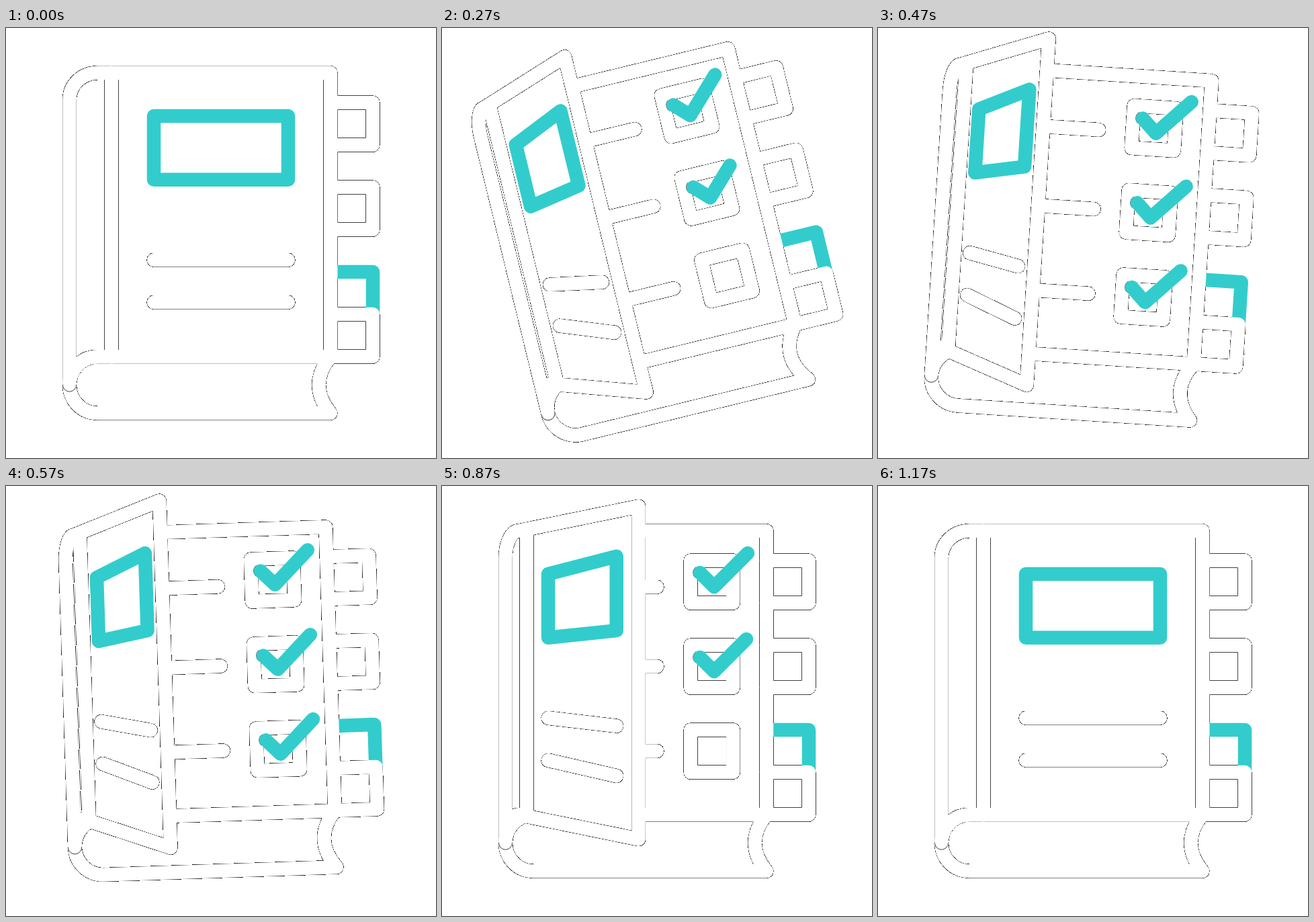
An HTML page with a canvas that plays this animation: 640 px wide and 640 px high, repeating every 1670 ms.

```html
<!DOCTYPE html>
<html lang="en">
<head>
<meta charset="utf-8">
<title>Checklist book</title>
<style>
  html, body { margin: 0; width: 100%; height: 100%; overflow: hidden; background: #fff; }
  canvas { display: block; width: 100vw; height: 100vh; }
</style>
</head>
<body>
<canvas id="stage" width="640" height="640"></canvas>
<script>
const SIZE = 640, LOOP = 1670, LAST_STEP = 35, STEPS_PER_MS = 0.03;
const WHITE = '#fff', TEAL = '#33cccc', LINE = 20.5;
const PIVOT = { x: 304, y: 288 };
const TOP = 66.75, BOTTOM = 489.25, SPINE = 94.5, EDGE = 483;
const ROWS = [0, 126, 252];
const CHECK_LENGTH = Math.hypot(21, 21) + Math.hypot(50, 50);

// Key times are in animation steps of 1/30 s.
const TILT = [[0, 0], [7.2, -15], [12.3, 5], [19.5, -4.5], [22.7, 0]];
const OPENING = [[0, 0], [8.9, 1], [22, 1], [35, 0]];
const CHECKS = [
  [[0, 0], [4.4, 1], [30.5, 1], [35, 0]],
  [[4.2, 0], [9.2, 1], [25.5, 1], [30.5, 0]],
  [[9, 0], [14, 1], [20, 1], [25, 0]]
];

const ctx = document.getElementById('stage').getContext('2d', { willReadFrequently: true });

const mix = (a, b, u) => a + (b - a) * u;
const smooth = u => u * u * (3 - 2 * u);

function track(keys, time) {
  if (time <= keys[0][0]) return keys[0][1];
  for (let i = 1; i < keys.length; i++) {
    const [t0, v0] = keys[i - 1], [t1, v1] = keys[i];
    if (time <= t1) return mix(v0, v1, smooth((time - t0) / (t1 - t0)));
  }
  return keys[keys.length - 1][1];
}

function stroke(color, path, width = LINE) {
  ctx.strokeStyle = color;
  ctx.lineWidth = width;
  ctx.beginPath();
  path();
  ctx.stroke();
}

function lines(points, closed) {
  points.forEach(([x, y], i) => i ? ctx.lineTo(x, y) : ctx.moveTo(x, y));
  if (closed) ctx.closePath();
}

const polyline = (color, points, closed) => stroke(color, () => lines(points, closed));

function drawTab(color, y) {
  polyline(color, [[EDGE, y], [546, y], [546, y + 63], [EDGE, y + 63]]);
}

function drawBook() {
  ctx.lineCap = 'butt';
  polyline(TEAL, [[EDGE, 363], [546, 363], [546, 426]]);
  ctx.lineCap = 'round';
  drawTab(WHITE, 111);
  drawTab(WHITE, 237);
  drawTab(WHITE, 426);
  polyline(WHITE, [[136, TOP], [EDGE, TOP], [EDGE, BOTTOM]]);
  stroke(WHITE, () => {
    ctx.moveTo(EDGE, BOTTOM);
    ctx.lineTo(136.5, BOTTOM);
    ctx.arc(136.5, BOTTOM + 42, 42, -Math.PI / 2, Math.PI / 2, true);
    ctx.lineTo(EDGE, BOTTOM + 84);
    ctx.quadraticCurveTo(448.4, 531, EDGE, BOTTOM);
  });
}

function drawPage(step) {
  ROWS.forEach((dy, i) => {
    const pillY = i ? 142.5 + dy : 150.3;
    polyline(WHITE, [[200, pillY], [320, pillY]]);
    polyline(WHITE, [[370, 111 + dy], [433.3, 111 + dy], [433.3, 174 + dy], [370, 174 + dy]], true);

    const drawn = track(CHECKS[i], step) * CHECK_LENGTH;
    if (drawn <= 0) return;
    stroke('#222', () => ctx.arc(384, 129 + dy, 10.4, Math.PI * 0.75, Math.PI * 1.3), 0.8);
    ctx.setLineDash([drawn, 300]);
    polyline(TEAL, [[384, 129 + dy], [405, 150 + dy], [455, 100 + dy]]);
    ctx.setLineDash([]);
  });
}

function drawCover(open) {
  const shift = 47 * open;
  const right = mix(EDGE, 237, open);
  const bend = mix(136, 108, open);
  const hinge = mix(157, 117, open);
  const hingeShift = shift * (hinge - bend) / (right - bend);
  const rx = bend - SPINE;

  const outline = () => {
    ctx.moveTo(SPINE, 531);
    ctx.lineTo(SPINE, TOP + 40);
    ctx.ellipse(bend, TOP + 40, rx, 40, 0, Math.PI, Math.PI * 1.5);
    ctx.lineTo(right, TOP - shift);
    ctx.lineTo(right, BOTTOM + shift);
    ctx.lineTo(bend, BOTTOM);
    ctx.ellipse(bend, BOTTOM + 42, rx, 42, 0, Math.PI * 1.5, Math.PI, true);
  };

  // The cover hides the page although its inside stays empty.
  ctx.globalCompositeOperation = 'destination-out';
  ctx.beginPath();
  outline();
  ctx.fill();
  ctx.globalCompositeOperation = 'source-over';

  stroke(WHITE, outline);
  polyline(WHITE, [[hinge, TOP - hingeShift], [hinge, BOTTOM + hingeShift]]);
  stroke('#111', () => ctx.arc(SPINE, 531, 10.2, 0, Math.PI), 0.8);

  const left = mix(220, 140, open), far = mix(420, 213, open);
  polyline(TEAL, [
    [left, 131], [far, mix(131, 97, open)],
    [far, mix(225.7, 212, open)], [left, 225.7]
  ], true);
  polyline(WHITE, [[left, 345.25], [far, 345.25 + 15.4 * open]]);
  polyline(WHITE, [[left, 408.25], [far, 408.25 + 30 * open]]);
}

// Soft edges of white strokes turn dark; other soft edges blend into white.
function finishEdges() {
  const image = ctx.getImageData(0, 0, SIZE, SIZE);
  const px = image.data;
  for (let i = 0; i < px.length; i += 4) {
    const alpha = px[i + 3];
    const isWhite = px[i] > 128;
    for (let c = i; c < i + 3; c++) {
      px[c] = alpha > 5 && isWhite ? px[c] * alpha / 255 : mix(255, px[c], alpha / 255);
    }
    px[i + 3] = 255;
  }
  ctx.putImageData(image, 0, 0);
}

function draw(step) {
  ctx.setTransform(1, 0, 0, 1, 0, 0);
  ctx.clearRect(0, 0, SIZE, SIZE);
  ctx.translate(PIVOT.x, PIVOT.y);
  ctx.rotate(track(TILT, step) * Math.PI / 180);
  ctx.translate(-PIVOT.x, -PIVOT.y);
  ctx.lineCap = ctx.lineJoin = 'round';
  drawBook();
  drawPage(step);
  drawCover(track(OPENING, step));
  finishEdges();
}

let shown = -1;
const start = performance.now();

function tick() {
  const time = (performance.now() - start) % LOOP;
  const step = Math.min(LAST_STEP, Math.floor(time * STEPS_PER_MS + 0.12));
  if (step !== shown) draw(shown = step);
  requestAnimationFrame(tick);
}
tick();
</script>
</body>
</html>
```
